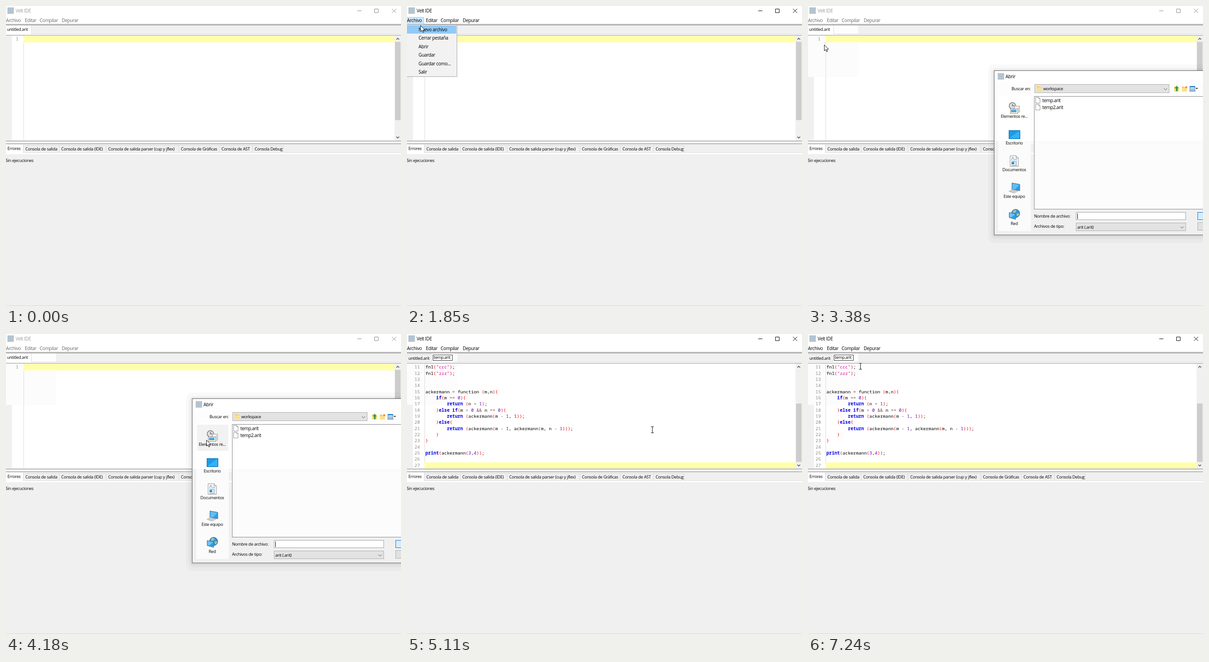
Write an HTML page that moves like this. It is 858 by 652 pixels and loops after 7950 ms.

```html
<!DOCTYPE html>
<html lang="es">
<head>
<meta charset="utf-8">
<title>Velt IDE</title>
<style>
  html, body { margin: 0; width: 100%; height: 100%; overflow: hidden; background: #f0f0f0; }
  svg { display: block; }
  text { white-space: pre; }
  .ui { font: 500 10px "Open Sans", "Noto Sans", sans-serif; letter-spacing: -.35px; }
  .small { font: 500 9.2px "Open Sans", "Noto Sans", sans-serif; letter-spacing: -.35px; word-spacing: .3px; }
  .code { font: 9.73px "Noto Sans Mono", "DejaVu Sans Mono", monospace; }
  .mid { text-anchor: middle; }
  .num { text-anchor: end; fill: #8c8c8c; }
  .key { fill: #0000e6; font-weight: bold; }
  .sep { fill: #f00; }
  .lit { fill: #6400c8; }
  .str { fill: #dc009c; }
  .op { fill: #804040; }
  rect { shape-rendering: crispEdges; }
  .round { shape-rendering: auto; }
  #chrome { fill: #000; stroke: none; }
  #chrome path { fill: none; stroke: #000; }
  #chrome.idle { fill: #6b6b6b; }
  #chrome.idle .title { fill: #999; }
  #chrome.idle path { stroke: #8c8c8c; }
</style>
</head>
<body>
<svg id="stage" width="858" height="652" viewBox="0 0 858 652"></svg>
<script>
const LOOP = 7950;
const T = { press: 1540, menu: 1620, dialog: 3380, place: 4160, pick: 4710, named: 4780, close: 5010, load: 5110 };
const CLICKS = [[1540, 1700], [2840, 2920], [4710, 5010]];

// Cursor moves: start, end, number of steps, target x, y, optional bend x, y
const START = [571, 587];
const MOVES = [
  [550, 700, 3, 340, 311],
  [850, 1620, 11, 27, 36],
  [1850, 1850, 1, 29, 42],
  [1925, 2380, 7, 34, 81],
  [2455, 2530, 2, 34, 84],
  [2690, 2690, 1, 35, 84],
  [3700, 4480, 11, 531, 207, 402, 288],
  [5110, 5110, 1, 533, 208],
  [5560, 6330, 11, 103, 54],
  [6410, 6410, 1, 102, 54],
  [6560, 7240, 10, 114, 70],
];

const esc = s => s.replace(/&/g, '&amp;').replace(/</g, '&lt;').replace(/>/g, '&gt;');
const text = (x, y, s, cls = 'ui', extra = '') => `<text x="${x}" y="${y}" class="${cls}" ${extra}>${esc(s)}</text>`;
const box = (x1, y1, x2, y2, fill, extra = '') =>
  `<rect x="${x1}" y="${y1}" width="${x2 - x1}" height="${y2 - y1}" fill="${fill}" ${extra}/>`;
const frame = (x1, y1, x2, y2, fill, stroke) => box(x1 + .5, y1 + .5, x2 - .5, y2 - .5, fill, `stroke="${stroke}"`);
const path = (d, fill, extra = '') => `<path d="${d}" fill="${fill}" ${extra}/>`;
const line = (d, stroke, w = 1) => path(d, 'none', `stroke="${stroke}" stroke-width="${w}"`);
const group = (id, body) => `<g id="${id}">${body}</g>`;
const at = (x, y, body) => `<g transform="translate(${x} ${y})">${body}</g>`;
const appIcon = (x, y) => box(x, y, x + 14, y + 14, '#b4c4d0');

const CODE = `fn1("ccc");
fn1("zzz");


ackermann = function (m,n){
    if(m == 0){
        return (n + 1);
    }else if(m > 0 && n == 0){
        return (ackermann(m - 1, 1));
    }else{
        return (ackermann(m - 1, ackermann(m, n - 1)));
    }
}

print(ackermann(3,4));

`.split('\n');
const RULES = [
  ['str', /^"[^"]*"$/], ['key', /^(if|else|return|print)$/], ['lit', /^\d+$/],
  ['sep', /^[(){}]$/], ['op', /^[=+\-><&]+$/],
];
const paint = s => s.match(/"[^"]*"|\w+|[(){}]|[=+\-><&]+|\s+|./g).map(tok => {
  const rule = RULES.find(r => r[1].test(tok));
  return rule ? `<tspan class="${rule[0]}">${esc(tok)}</tspan>` : esc(tok);
}).join('');

function listing() {
  return CODE.map((s, i) => {
    const y = (75.3 + i * 13.33).toFixed(2);
    return text(28, y, String(11 + i), 'code num') +
      (s ? `<text x="40" y="${y}" class="code">${paint(s)}</text>` : '');
  }).join('');
}

function chrome() {
  return group('chrome',
    text(21, 14, 'Velt IDE', 'ui title') +
    [[0, 'Archivo'], [41, 'Editar'], [73, 'Compilar'], [121, 'Depurar']].map(m => text(m[0], 35, m[1])).join('') +
    '<path d="M763 10.5h9M800.5 6.5h8v8h-8zM838.5 6l9 9M847.5 6l-9 9"/>');
}

function editor() {
  return box(0, 39, 858, 40, '#a0a0a0') + box(0, 40, 858, 41, '#e0e0e0') + box(0, 41, 858, 42, '#8a8a8a') +
    box(0, 42, 858, 60, '#f0f0f0') + box(0, 60, 858, 61, '#dcdcdc') + box(0, 63, 858, 64, '#909090') +
    box(0, 64, 13, 292, '#f0f0f0') + box(844, 64, 858, 292, '#f0f0f0') +
    group('ghost', box(56, 42, 109, 60, '#fdfdfd') + box(0, 64, 109, 154, '#fcfcfc')) +
    box(37.5, 64, 38.5, 292, '#dcdcdc') +
    group('blank',
      box(0, 42, 55, 61, '#fff') + box(55, 42, 56, 60, '#dcdcdc') + text(2, 54, 'untitled.arit', 'small') +
      box(38, 65, 844, 79, '#ffffaa') + text(27, 74.5, '1', 'code num') + box(845, 78, 857, 248, '#cdcdcd')) +
    group('loaded',
      box(0, 44, 54, 45, '#dcdcdc') + box(53, 44, 54, 60, '#dcdcdc') + text(3, 55.5, 'untitled.arit', 'small') +
      box(54, 42, 101, 61, '#fff') + frame(56, 45, 99, 58, 'none', '#333') + text(58, 54, 'temp.arit', 'small') +
      box(38, 279, 844, 292, '#ffffaa') + listing() + box(845, 151, 857, 278, '#cdcdcd')) +
    line('M848 73l3 -3l3 3M848 284l3 3l3 -3', '#444', 1.4);
}

function consoles() {
  const tabs = [[42, 'Consola de salida'], [120, 'Consola de salida (IDE)'],
    [222, 'Consola de salida parser (cup y jflex)'], [380, 'Consola de Gràficas'],
    [468, 'Consola de AST'], [540, 'Consola Debug']];
  return box(0, 292, 858, 652, '#f0f0f0') + box(0, 293, 858, 294, '#808080') + box(0, 294, 858, 295, '#fff') +
    box(0, 299, 858, 300, '#8a8a8a') + box(0, 303, 603, 304, '#d9d9d9') +
    box(0, 318, 858, 319, '#dcdcdc') + box(0, 319, 858, 322, '#fff') +
    group('tabHover', box(218, 304, 375, 318, '#d8eaf9')) +
    [115, 217, 375, 463, 535, 602].map(x => box(x, 303, x + 1, 318, '#d9d9d9')).join('') +
    box(0, 301, 37, 320, '#fff') + box(37, 301, 38, 319, '#d9d9d9') +
    text(3, 313, 'Errores', 'small') + tabs.map(t => text(t[0], 314, t[1], 'small')).join('') +
    text(-1, 338.5, 'Sin ejecuciones', 'small') + box(0, 651, 858, 652, '#d8d8d8');
}

function menu() {
  const items = ['Nuevo archivo', 'Cerrar pestaña', 'Abrir', 'Guardar', 'Guardar como...', 'Salir'];
  return group('menuBar', frame(-1, 24, 37, 40, '#cce8ff', '#99d1ff')) +
    group('menu', frame(-1, 40, 109, 154, '#f2f2f2', '#a5a5a5') + box(0, 42, 107, 60, '#91c9f7', 'id="itemHover"') +
      items.map((s, i) => text(25, 55 + i * 18.4, s)).join(''));
}

const sheet = (x, y) => at(x, y, path('M.5 .5h6.5l3 3v9.5h-9.5z', '#fff', 'stroke="#8e8e8e"') + line('M7 .5v3h3', '#8e8e8e'));
const folder = (x, y) => at(x, y, path('M0 1h5l1 2h5v9h-11z', '#f3cf62') + path('M0 4h11v8h-11z', '#fbe08c'));
const combo = (x1, y1, x2, y2) => frame(x1, y1, x2, y2, '#e3e3e3', '#adadad') +
  line(`M${x2 - 12} ${(y1 + y2) / 2 - .5}l3.5 3.5l3.5 -3.5`, '#555');

function places() {
  const icons = [
    '<circle cx="-4" cy="-4" r="7" fill="#dedede" stroke="#777" stroke-width="1.5"/>' + line('M-4 -8v4h4', '#333') +
      box(0, -4, 11, 9, '#f4f4f4', 'stroke="#9a9a9a"') + box(-9, 2, 7, 12, '#fff', 'stroke="#8f8f8f"') +
      box(-7, 4, 5, 8, '#58aee0') + box(-7, 8, 5, 10, '#6f9c66') + line('M8 0h2M8 3h2M8 6h2', '#888'),
    box(-12, -9, 12, 9, '#1a9bea', 'stroke="#0f6fae"') + path('M-11 8L11 -8V8z', '#31b2f8'),
    path('M-9 -12h13l5 5v18h-18z', '#fafafa', 'stroke="#929292"') + path('M4 -12v5h5', '#ddd', 'stroke="#929292"') +
      line('M-6 -2l3 -7l3 7M1 -4h5M-6 0h12M2 3h4M2 6h4M-6 9h12', '#3d8fc4') + box(-6, 2, 0, 7, '#2c91cc'),
    path('M-5 -11L12 -8V6L-5 3z', '#2f9de6', 'stroke="#5b6a76"') + path('M-4 -10L11 -7L2 3L-4 2z', '#62bdf5') +
      path('M-12 7L-4 3L8 7L0 11z', '#d9dde0', 'stroke="#9ba0a4" stroke-width=".7"') + line('M-9 7l8 3M-6 5l9 3', '#8d9397', .7),
    '<circle cx="3" cy="-3" r="9" fill="#3f8fca" stroke="#2a6797"/>' + path('M-2 -9q5 -3 7 0q-1 4 -5 5q-4 0 -2 -5M5 -3q6 -1 6 2q-3 5 -5 4z', '#9ac7a8') +
      path('M-11 -5L3 -2V10L-11 6z', '#2f9de6', 'stroke="#56748a"') + path('M-10 -4L2 -1L-7 6L-10 5z', '#6dc3f6'),
  ];
  const names = ['Elementos re...', 'Escritorio', 'Documentos', 'Este equipo', 'Red'];
  return names.map((s, i) =>
    at(448, 221 + i * 58.2, icons[i]) + text(448, (242.5 + i * 58.3).toFixed(1), s, 'small mid')).join('');
}

function dialog() {
  const shadow = (x, y, b, r, a) =>
    `<rect class="round" x="${x}" y="${y}" width="500" height="${b - y}" rx="${r}" fill="#000" fill-opacity="${a}"/>`;
  return group('dialog',
    shadow(391, 127, 515, 14, .025) + shadow(397, 135, 507, 10, .03) + shadow(401, 138, 502, 6, .05) +
    box(404, 140, 870, 498, '#f0f0f0') + box(405, 141, 870, 293, '#fdfdfd') + box(405, 141, 870, 166, '#fff') +
    box(484, 295, 491, 299, '#fafafa') + box(484, 319, 491, 322, '#fff') +
    frame(404, 140, 870, 498, 'none', '#606060') +
    appIcon(412, 146) + text(429, 156.5, 'Abrir') +
    text(442, 182.5, 'Buscar en:', 'small') + combo(492, 170, 785, 189) + folder(497, 173) + text(511, 182.5, 'workspace', 'small') +
    folder(795, 174) + path('M799 185v-6h-2.5l4.500 -6l4.500 6h-2.500v6z', '#3f9f35') +
    folder(812, 174) + path('M820 174l4 1.500l-1 3.500l-4 -1z', '#f08b2c') +
    frame(829, 174, 841, 186, '#fff', '#2874b8') + box(829, 174, 841, 177, '#2f86d2') +
    [831, 834, 837].map(x => box(x, 179, x + 2, 181, '#2f86d2') + box(x, 182, x + 2, 184, '#4a6780')).join('') +
    path('M842 178h5l-2.500 3z', '#222') +
    box(413, 194, 484, 293, '#fff') + box(413, 293, 484, 489, '#fbfbfb') +
    group('placeHover', box(415, 197, 483, 254, '#f2f2f2')) + places() +
    frame(491, 196, 870, 442, '#fcfcfc', '#828790') + box(492, 197, 858, 293, '#fff') + box(492, 295, 858, 299, '#fafafa') +
    group('selected', frame(492, 197, 553, 212, '#0078d7', '#1f4a70')) +
    sheet(494, 198) + sheet(494, 213) + text(509, 208.5, 'temp.arit', 'ui', 'id="file"') + text(509, 223.5, 'temp2.arit') +
    text(491, 459.5, 'Nombre de archivo:', 'small') + frame(582, 448, 821, 465, '#fff', '#a3a3a3') +
    group('caret', box(585, 451, 586, 463, '#000')) + group('typed', text(585, 460.5, 'temp.arit', 'small')) +
    text(491, 481.5, 'Archivos de tipo:', 'small') + combo(582, 471, 821, 489) + text(585, 484, 'arit (.arit)', 'small') +
    frame(846, 448, 880, 465, '#d9ecfa', '#0078d7') + frame(846, 470, 880, 488, '#e1e1e1', '#adadad'));
}

const stage = document.getElementById('stage');
stage.innerHTML = box(0, 0, 858, 652, '#fff') + appIcon(3, 3) + editor() + consoles() + menu() + chrome() + dialog() +
  group('pointer',
    '<circle id="click" r="10" fill="#ffee00" fill-opacity=".55"/>' +
    group('arrow', path('M.5 .5V13.500L3.500 10.800L5.700 15.500L7.600 14.700L5.500 10H9.800z', '#fff', 'stroke="#000" stroke-width=".9"')) +
    group('beam', line('M-3 -6.500h2.200l.8 .7l.8 -.7h2.200M0 -6v12.500M-3 6.800h2.200l.8 -.7l.8 .7h2.200', '#111', 1.1)));

const el = {};
stage.querySelectorAll('[id]').forEach(n => el[n.id] = n);
const show = (id, on) => { el[id].style.display = on ? '' : 'none'; };

function cursorAt(t) {
  let [x, y] = START;
  for (const [from, to, steps, ex, ey, bx = (x + ex) / 2, by = (y + ey) / 2] of MOVES) {
    if (t < from) break;
    const k = steps > 1 ? Math.min(steps - 1, Math.floor((t - from) / (to - from) * (steps - 1) + .02)) : 0;
    const u = (1 - Math.cos(Math.PI * (k + 1) / steps)) / 2, v = 1 - u;
    x = v * v * x + 2 * u * v * bx + u * u * ex;
    y = v * v * y + 2 * u * v * by + u * u * ey;
  }
  return [Math.round(x), Math.round(y)];
}

function draw(t) {
  const [x, y] = cursorAt(t);
  const within = (a, b) => t >= a && t < b;
  const menuOpen = within(T.menu, T.dialog), open = within(T.dialog, T.close), loaded = t >= T.load;
  const active = within(T.press, T.dialog) || t >= T.close;

  el.chrome.setAttribute('class', active ? '' : 'idle');
  show('menu', menuOpen);
  show('menuBar', menuOpen);
  show('itemHover', y >= 42);
  el.itemHover.setAttribute('y', Math.round(42 + Math.floor((y - 42) / 18.4) * 18.4));
  show('tabHover', t < T.press && x >= 218 && x < 375 && y >= 303 && y < 319);

  show('ghost', t >= T.dialog);
  show('blank', !loaded);
  show('loaded', loaded);

  show('dialog', open);
  show('placeHover', t >= T.place);
  show('selected', t >= T.pick);
  el.file.setAttribute('fill', t >= T.pick ? '#fff' : '#000');
  show('caret', t < T.pick);
  show('typed', t >= T.named);

  const beam = loaded && y >= 63;
  show('pointer', t >= MOVES[0][0]);
  el.pointer.setAttribute('transform', `translate(${x} ${y})`);
  show('arrow', !beam);
  show('beam', beam);
  show('click', CLICKS.some(c => within(...c)));
}

const begin = performance.now();
function tick() {
  draw((performance.now() - begin) % LOOP);
  requestAnimationFrame(tick);
}
tick();
</script>
</body>
</html>
```
